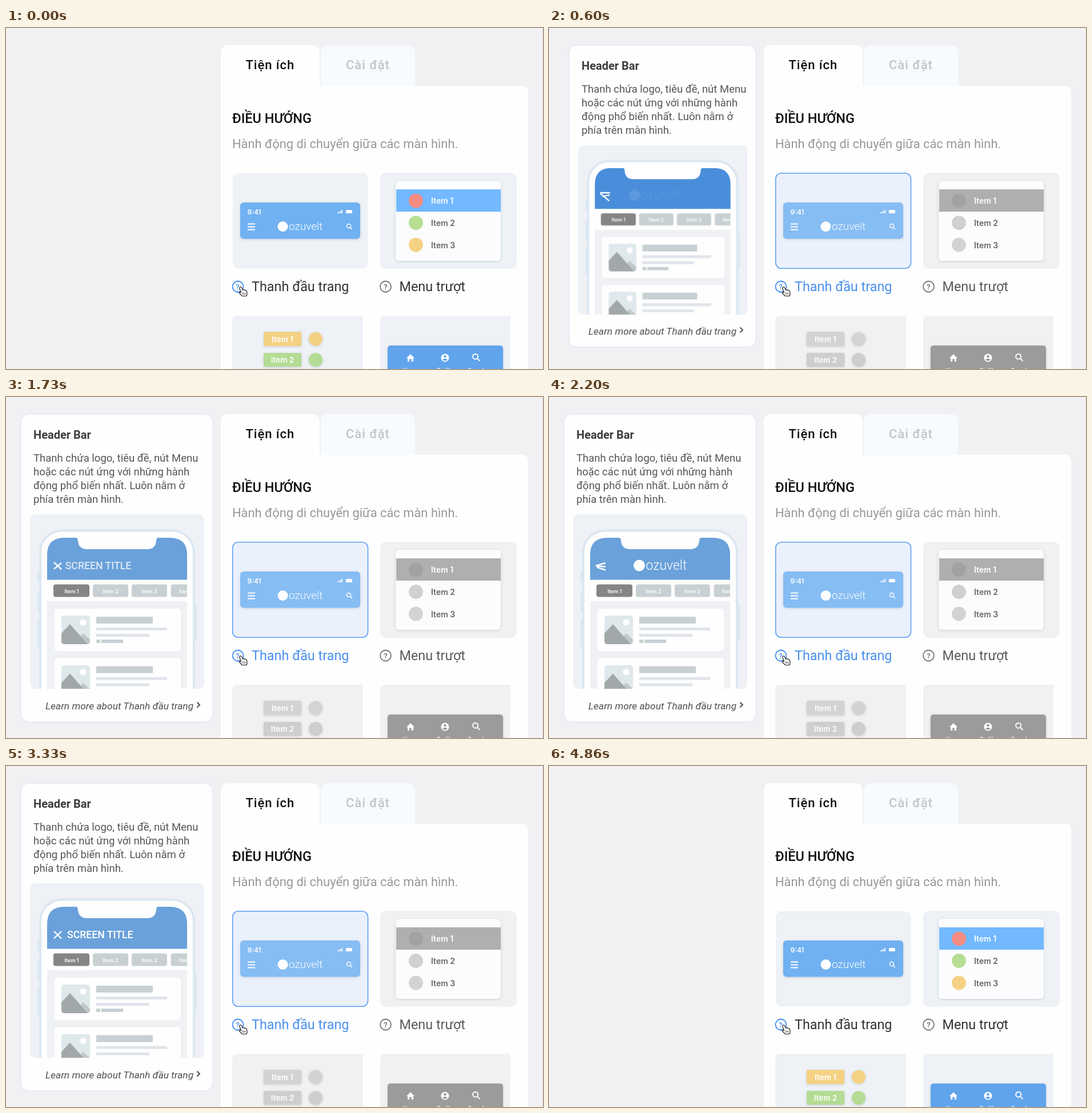
An HTML page for the animation above (4.93 s loop, 940 by 596 pixels).

```html
<!DOCTYPE html>
<html lang="vi">
<head>
<meta charset="utf-8">
<title>Tiện ích</title>
<style>
@property --shrink { syntax: "<number>"; inherits: true; initial-value: 0; }
html, body { margin: 0; width: 100%; height: 100%; overflow: hidden; background: #f1f1f4; }
svg { display: block; width: 100vw; height: 100vh; }
text { font-family: Roboto, sans-serif; }
.ui { font-family: Inter, sans-serif; font-weight: 600; }
.mid { text-anchor: middle; }
.white { fill: #fff; }
.line { fill: none; stroke: #fff; stroke-width: 2; }
.label { font-size: 23.4px; fill: #333; }
.tab { font-size: 22px; font-weight: 500; letter-spacing: .95px; }
.soft { filter: drop-shadow(0 1px 2px rgba(40, 60, 90, .2)); }
.brand { font-weight: 300; fill: #fff; }

/* every part shares one loop */
.popup, .gray, .chosen, .faded, .active, .dim, .bar, .logo, .title, .icon path {
  animation: 4930ms linear infinite;
}
.gray { animation-name: gray; }
.chosen { animation-name: chosen; }
.faded { animation-name: faded; }
.active { animation-name: active; }
.dim { animation-name: dim; }
@keyframes gray {
  0%, 1.2% { filter: grayscale(0); }
  8.5%, 90.5% { filter: grayscale(1); }
  98.5%, 100% { filter: grayscale(0); }
}
@keyframes chosen {
  0%, 1.2%, 98.5%, 100% { fill: #eef2f6; stroke: #5b9ef200; }
  8.5%, 90.5% { fill: #ebf1fc; stroke: #5b9ef2; }
}
@keyframes faded {
  0%, 1.2%, 98.5%, 100% { opacity: 1; }
  8.5%, 90.5% { opacity: .82; }
}
@keyframes active {
  0%, 1.2%, 98.5%, 100% { fill: #333; }
  8.5%, 90.5% { fill: #4a90ee; }
}
@keyframes dim {
  0%, 1.2%, 98.5%, 100% { fill: #333; }
  8.5%, 90.5% { fill: #5a5a5a; }
}

.popup { transform-origin: 361px 30px; animation-name: popup; }
.popup .box {
  x: calc(27px + 1px * var(--shrink));
  width: calc(334px - 1px * var(--shrink));
  height: calc(536px - 1.15px * var(--shrink));
  fill: #fefefe;
  filter: drop-shadow(0 0 2px #d9e5f4);
}
.popup .copy { transform: translateX(calc(1px * var(--shrink))); }
.popup .more { transform: translateY(calc(-1.15px * var(--shrink))); }
.popup .shot { transform-origin: 347px 205px; transform: scale(calc(1 - var(--shrink) / 305)); }
@keyframes popup {
  0%, 5.5% { opacity: 0; transform: scale(.55); --shrink: 9; }
  10.75% { opacity: .8; transform: scale(.88); }
  12.17% { opacity: 1; transform: none; }
  12.6% { --shrink: 9; }
  15% { --shrink: 0; }
  88.3% { opacity: 1; transform: none; }
  96%, 100% { opacity: 0; transform: none; --shrink: 0; }
}

.bar { animation-name: bar; }
@keyframes bar {
  0%, 12.17% { fill: #4a8edb; }
  20.3% { fill: #4c8ddb; }
  21.5% { fill: #5290da; }
  26.98%, 67.55% { fill: #6aa1da; }
  75.66%, 100% { fill: #478adb; }
}
.logo { animation-name: logo; }
@keyframes logo {
  0%, 9.13%, 44.62%, 55.17%, 90.67%, 100% { opacity: 1; transform: none; }
  12.17%, 41.78%, 58.22%, 87.83% { opacity: .1; transform: translateX(-14px); }
  13.39%, 40.57%, 59.43%, 86.61% { opacity: 0; transform: translateX(-17px); }
}
.title { animation-name: title; }
@keyframes title {
  0%, 14.2%, 39.76%, 60.25%, 85.81%, 100% { opacity: 0; transform: translateX(-14px); }
  19.47%, 33.67%, 65.52%, 79.72% { opacity: 1; transform: none; }
}
.icon path { fill: none; stroke: #fff; stroke-width: 2.4; }
.icon .a { animation-name: strokeA; }
.icon .b { animation-name: strokeB; }
.icon .c { animation-name: strokeC; }
@keyframes strokeA {
  0%, 10.14%, 47.67%, 56.19%, 93.71%, 100% { d: path("M82 289.5L99 289.5"); }
  12.17%, 58.22% { d: path("M82 290.5L99.5 290.5"); }
  17.24%, 34.48%, 63.29%, 80.53% { d: path("M84 289L97 301.5"); }
  41.78%, 87.83% { d: path("M82.5 287L98.5 301"); }
  44.62%, 90.67% { d: path("M82 295L99 290"); }
}
@keyframes strokeB {
  0%, 10.14%, 47.67%, 56.19%, 93.71%, 100% { d: path("M82 295.5L99 295.5"); }
  12.17%, 58.22% { d: path("M82 292L98 305"); }
  17.24%, 34.48%, 63.29%, 80.53% { d: path("M90 295L91 295.5"); }
  41.78%, 87.83% { d: path("M87 292L98 294"); }
  44.62%, 90.67% { d: path("M82 295.5L99 296.5"); }
}
@keyframes strokeC {
  0%, 10.14%, 47.67%, 56.19%, 93.71%, 100% { d: path("M82 301.5L99 301.5"); }
  12.17%, 58.22% { d: path("M86 297L99 294.5"); }
  17.24%, 34.48%, 63.29%, 80.53% { d: path("M84 301.5L97 289"); }
  41.78%, 87.83% { d: path("M84 291L97 300"); }
  44.62%, 90.67% { d: path("M84 297.5L99 302.5"); }
}
</style>
</head>
<body>
<svg viewBox="0 0 940 596" preserveAspectRatio="none">
  <defs>
    <clipPath id="shotClip"><rect x="42" y="205" width="305" height="305" rx="9"/></clipPath>
    <clipPath id="screenClip"><path d="M72 510V276Q72 246 102 246H287Q317 246 317 276V510Z"/></clipPath>
    <clipPath id="thumbClip"><rect width="50" height="50" rx="5"/></clipPath>
    <g id="search"><circle cx="-1" cy="-1" r="3.5"/><path d="M1.6 1.6L5 5"/></g>
    <g id="post">
      <rect width="221" height="74" rx="5" fill="#fefefe"/>
      <g transform="translate(12 12)" clip-path="url(#thumbClip)">
        <rect width="50" height="50" fill="#dfe8eb"/>
        <circle cx="38" cy="12" r="5.6" fill="#fff"/>
        <path d="M22 50L38 31L50 42V50Z" fill="#c0c7c9"/>
        <path d="M0 31L15 15L46 50H0Z" fill="#a2a8aa"/>
      </g>
      <path d="M73 14h99v12h-99zM73 54h7v6h-7zM82 54h38v6h-38z" fill="#c8d0d3"/>
      <path d="M73 33h124v5h-124zM73 44h93v5h-93z" fill="#dfe4ea"/>
    </g>
  </defs>

  <rect width="940" height="596" fill="#f1f1f4"/>
  <path d="M939.5 0V596" stroke="#e6e6ea"/>
  <path d="M551 101V44Q551 30 565 30H702Q716 30 716 44V101Z" fill="#f7fafe"/>
  <path d="M376 596V44Q376 30 390 30H535Q549 30 549 44V101H902Q914 101 914 113V596Z" fill="#fefefe"/>
  <text class="tab" x="419.500" y="72" fill="#111">Tiện ích</text>
  <text class="tab" x="595" y="72" fill="#c3c5c8">Cài đặt</text>
  <text x="396" y="166" font-size="23.500" font-weight="500" fill="#111">ĐIỀU HƯỚNG</text>
  <text x="396" y="209.500" font-size="21.900" fill="#989898">Hành động di chuyển giữa các màn hình.</text>

  <!-- header card -->
  <rect class="chosen" x="396.750" y="253.750" width="236.750" height="166.500" rx="10" stroke-width="1.600"/>
  <g class="faded">
    <rect class="soft" x="410" y="305" width="210" height="63.500" rx="6" fill="#70b1f1"/>
    <text class="ui white" x="422.500" y="326" font-size="12">9:41</text>
    <path class="white" d="M580 322h1.600v2h-1.600zM582.500 321h1.600v3h-1.600zM585 319.500h1.600v4.500h-1.600zM587.500 318h1.600v6h-1.600z"/>
    <rect class="white" x="595" y="318" width="11" height="6" rx="1.500"/>
    <path class="line" d="M423 342.500h13M423 347.500h13M423 352.500h13"/>
    <circle class="white" cx="484.500" cy="347" r="9"/>
    <text class="brand" x="495" y="353" font-size="19">ozuvelt</text>
    <use href="#search" class="line" style="stroke-width:1.500" x="601" y="347"/>
  </g>

  <!-- menu card -->
  <g class="gray">
    <rect x="655" y="253" width="239" height="168" rx="10" fill="#eef2f6"/>
    <rect class="soft" x="682" y="267" width="184" height="140" rx="6" fill="#fcfcfe"/>
    <path d="M683 282H866V321H683Z" fill="#72b9ff"/>
    <circle cx="717.500" cy="302" r="12.500" fill="#f58c82"/>
    <circle cx="717.500" cy="340.500" r="12.500" fill="#b7de93"/>
    <circle cx="717.500" cy="379" r="12.500" fill="#f5d184"/>
    <g font-size="14" fill="#666">
      <text class="ui white" x="744" y="307">Item 1</text>
      <text class="ui" x="744" y="346">Item 2</text>
      <text class="ui" x="744" y="384.500">Item 3</text>
    </g>
  </g>

  <g fill="none" stroke-width="1.800">
    <circle cx="406" cy="452" r="9.500" stroke="#3f8ef3"/>
    <circle cx="664.500" cy="452" r="9.500" stroke="#777"/>
  </g>
  <text class="mid" x="405.500" y="457" font-size="13" font-weight="500" fill="#3f8ef3">?</text>
  <text class="mid" x="664.500" y="457" font-size="13" font-weight="500" fill="#666">?</text>
  <text class="label active" x="430" y="459.500">Thanh đầu trang</text>
  <text class="label dim" x="688.500" y="459.500">Menu trượt</text>

  <!-- lower cards -->
  <g class="gray">
    <path d="M396 596V512Q396 503 405 503H625V596Z" fill="#eef2f6"/>
    <g class="soft">
      <rect x="451" y="531" width="66" height="25" rx="2" fill="#f5d184"/>
      <rect x="451" y="568" width="66" height="24" rx="2" fill="#b4dc94"/>
      <circle cx="542" cy="543.500" r="12" fill="#f5d184"/>
      <circle cx="542" cy="580" r="12" fill="#b4dc94"/>
    </g>
    <g font-size="13.500">
      <text class="ui white mid" x="484" y="548.500">Item 1</text>
      <text class="ui white mid" x="484" y="585">Item 2</text>
    </g>
  </g>
  <g class="gray">
    <path d="M655 596V512Q655 503 664 503H883V596Z" fill="#eef2f6"/>
    <rect class="soft" x="668" y="555" width="202" height="60" rx="5" fill="#60a4ec"/>
    <path class="white" d="M708 570L715 577H713V583H709.800V578.500H706.200V583H703V577H701Z"/>
    <circle class="white" cx="768.500" cy="576.500" r="7"/>
    <g fill="#60a4ec"><circle cx="768.500" cy="574" r="2.300"/><path d="M764 580Q768.500 575.500 773 580Q768.500 583.500 764 580Z"/></g>
    <use href="#search" class="line" style="stroke-width:1.500" transform="translate(823 575.500) scale(1.300)"/>
    <g font-size="9">
      <text class="ui white mid" x="708" y="601">Home</text>
      <text class="ui white mid" x="768.500" y="601">Profile</text>
      <text class="ui white mid" x="824" y="601">Search</text>
    </g>
  </g>

  <!-- help popup -->
  <g class="popup">
    <rect class="box" y="31" rx="13"/>
    <g class="copy" font-size="18.520" fill="#555">
      <text x="48" y="73" font-size="20" font-weight="700" fill="#3c3c3c">Header Bar</text>
      <text x="48" y="113">Thanh chứa logo, tiêu đề, nút Menu</text>
      <text x="48" y="137">hoặc các nút ứng với những hành</text>
      <text x="48" y="161">động phổ biến nhất. Luôn nằm ở</text>
      <text x="48" y="185">phía trên màn hình.</text>
    </g>
    <g class="more">
      <text x="69" y="546" font-size="17.350" font-style="italic" fill="#505050">Learn more about Thanh đầu trang</text>
      <path d="M334.500 533.500L339 538L334.500 542.500" fill="none" stroke="#444" stroke-width="1.800"/>
    </g>
    <g class="shot"><g clip-path="url(#shotClip)">
      <rect x="42" y="205" width="305" height="305" fill="#eef1f5"/>
      <path d="M57 305v18M57 340v34M57 389v48M332 364v61" stroke="#dbe7f1" stroke-width="4"/>
      <rect x="60" y="233.500" width="269" height="340" rx="38" fill="#fefefe" stroke="#dbe7f1" stroke-width="4"/>
      <g clip-path="url(#screenClip)">
        <rect x="72" y="357" width="245" height="153" fill="#eff1f4"/>
        <rect class="bar" x="72" y="246" width="245" height="73.500"/>
        <path class="white" d="M121 245Q126 246 126 251Q127 266 142 266H247Q262 266 263 251Q263 246 268 245Z"/>
        <g class="icon"><path class="a" d="M82 289.500L99 289.500"/><path class="b" d="M82 295.500L99 295.500"/><path class="c" d="M82 301.500L99 301.500"/></g>
        <g class="logo">
          <circle class="white" cx="158" cy="294.500" r="10"/>
          <text class="brand" x="169.500" y="302" font-size="23">ozuvelt</text>
        </g>
        <text class="title white" x="107" y="301" font-size="17.700" font-weight="500">SCREEN TITLE</text>
        <rect x="83" y="327.500" width="63" height="22" rx="4" fill="#858585"/>
        <g fill="#c8d0d3">
          <rect x="152" y="327.500" width="62" height="22" rx="4"/>
          <rect x="220" y="327.500" width="62" height="22" rx="4"/>
          <rect x="288.500" y="327.500" width="62" height="22" rx="4"/>
        </g>
        <g font-size="9">
          <text class="ui white mid" x="115" y="342.500">Item 1</text>
          <text class="ui white mid" x="183" y="342.500">Item 2</text>
          <text class="ui white mid" x="251" y="342.500">Item 3</text>
          <text class="ui white" x="303" y="342.500">Item 4</text>
        </g>
        <use href="#post" x="85" y="370"/>
        <use href="#post" x="85" y="456.500"/>
      </g>
    </g></g>
  </g>

  <path d="M409.500 453Q411.500 452 412.500 454L414.500 458Q416 456.800 417 458Q418.500 457.300 419.300 458.700Q421 458.300 421.500 460.500L422 465L421 468.500H413.500L408.500 463.500Q407.500 461.500 409.500 461.500L411.500 462.500L408.800 455Q408.500 453.500 409.500 453Z" fill="#fff" stroke="#222" stroke-width="1.200" stroke-linejoin="round"/>
  <path d="M414.500 462.500v3.500M416.700 462.500v3.500M418.900 462.500v3.500" stroke="#222" stroke-width=".8"/>
</svg>
</body>
</html>
```
